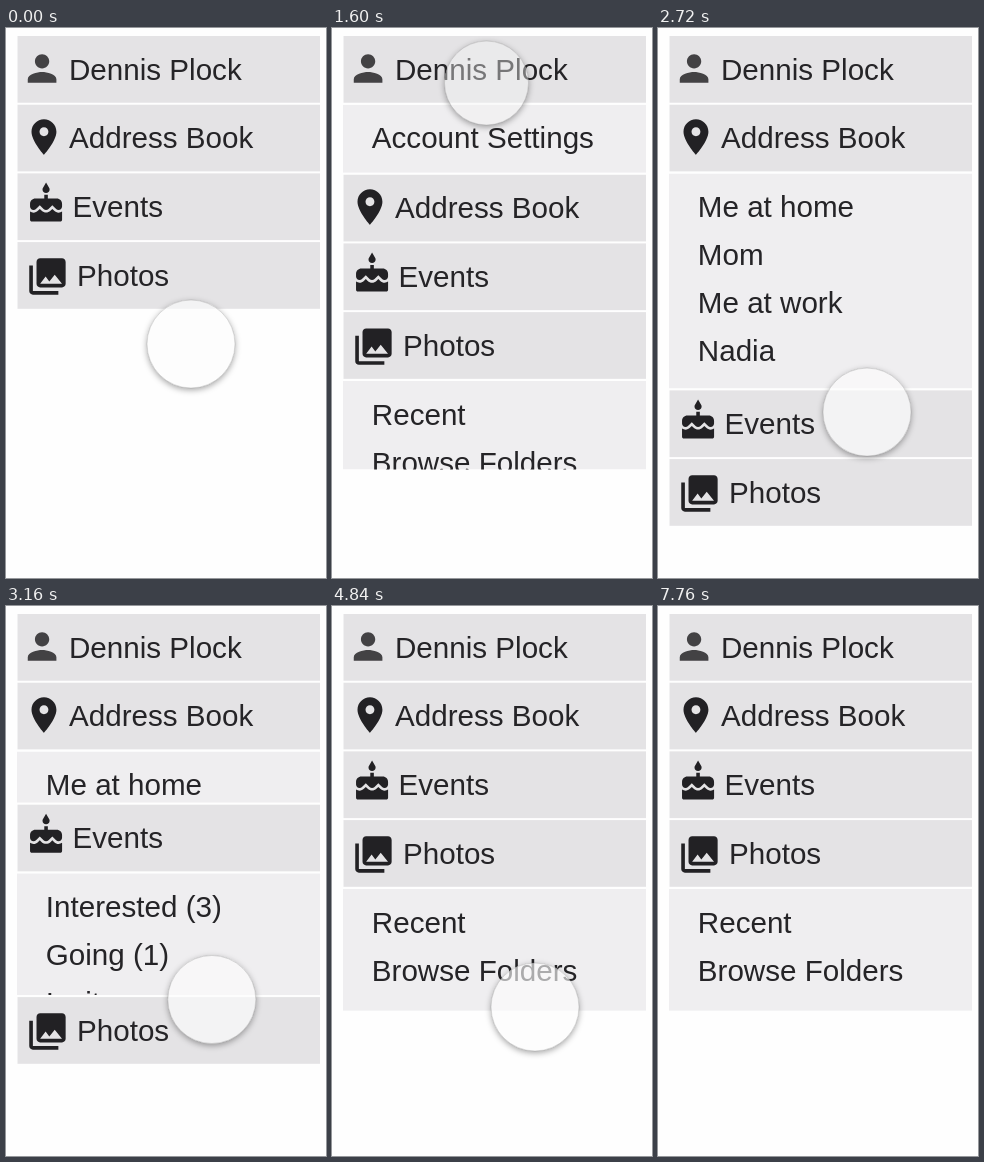
An HTML page with a canvas that plays this animation: 320 px wide and 550 px high, repeating every 7.8 s.

```html
<!DOCTYPE html>
<html lang="en">
<head>
<meta charset="utf-8">
<title>Accordion menu</title>
<style>
html, body { margin: 0; width: 100%; height: 100%; overflow: hidden; background: #fefefe; }
canvas { display: block; width: 320px; height: 550px; }
</style>
</head>
<body>
<canvas id="stage"></canvas>
<script>
const W = 320, H = 550, LOOP = 7800, SLIDE = 300;
const LEFT = 11.5, RIGHT = 314, TOP = 8, ROW = 66.7, GAP = 2, LINE = 48;

const canvas = document.getElementById('stage');
const ctx = canvas.getContext('2d');
const dpr = window.devicePixelRatio || 1;
canvas.width = W * dpr;
canvas.height = H * dpr;

const icons = {
  person: 'M12 12c2.21 0 4-1.79 4-4s-1.79-4-4-4-4 1.79-4 4 1.79 4 4 4zm0 2c-2.67 0-8 1.34-8 4v2h16v-2c0-2.66-5.33-4-8-4z',
  place: 'M12 2C8.13 2 5 5.13 5 9c0 5.25 7 13 7 13s7-7.75 7-13c0-3.87-3.13-7-7-7zm0 9.5c-1.38 0-2.5-1.12-2.5-2.5s1.12-2.5 2.5-2.5 2.5 1.12 2.5 2.5-1.12 2.5-2.5 2.5z',
  cake: 'M12 6c1.11 0 2-.9 2-2 0-.38-.1-.73-.29-1.03L12 0l-1.71 2.97c-.19.3-.29.65-.29 1.03 0 1.1.9 2 2 2zm4.6 9.99l-1.07-1.07-1.08 1.07c-1.3 1.3-3.58 1.31-4.89 0l-1.07-1.07-1.09 1.07C6.75 16.64 5.88 17 4.96 17c-.73 0-1.4-.23-1.96-.61V21c0 .55.45 1 1 1h16c.55 0 1-.45 1-1v-4.61c-.56.38-1.23.61-1.96.61-.92 0-1.79-.36-2.44-1.01zM18 9h-5V7h-2v2H6c-1.66 0-3 1.34-3 3v1.54c0 1.08.88 1.96 1.96 1.96.52 0 1.02-.2 1.38-.57l2.14-2.13 2.13 2.13c.74.74 2.03.74 2.77 0l2.14-2.13 2.13 2.13c.37.37.86.57 1.38.57 1.08 0 1.96-.88 1.96-1.96V12C21 10.34 19.66 9 18 9z',
  photos: 'M22 16V4c0-1.1-.9-2-2-2H8c-1.1 0-2 .9-2 2v12c0 1.1.9 2 2 2h12c1.1 0 2-.9 2-2zm-11-4l2.03 2.71L16 11l4 5H8l3-4zM2 6v14c0 1.1.9 2 2 2h14v-2H4V6H2z'
};

// full: height of the open panel including its gap
const menu = [
  { title: 'Dennis Plock', x: 63, full: 261, icon: 'person', ix: 14.6, iy: 11, size: 1.79, color: '#434244',
    items: ['Account Settings', 'My Orders', 'Games', 'Music Library', 'Video Library'] },
  { title: 'Address Book', x: 63, full: 217, icon: 'place', ix: 16.6, iy: 11, size: 1.78, color: '#222124',
    items: ['Me at home', 'Mom', 'Me at work', 'Nadia'] },
  { title: 'Events', x: 66.5, full: 164, icon: 'cake', ix: 18.7, iy: 9, size: 1.78, color: '#222124',
    items: ['Interested (3)', 'Going (1)', 'Invites'] },
  { title: 'Photos', x: 71, full: 124, icon: 'photos', ix: 19.6, iy: 12.6, size: 1.82, color: '#222124',
    items: ['Recent', 'Browse Folders'] }
];
for (const m of menu) m.shape = new Path2D(icons[m.icon]);

// [time, section] for each tap that opens a section
const taps = [[780, 3], [1497, 0], [2375, 1], [2960, 2], [3559, 3]];
const presses = [[700, 860], [1430, 1640], [2280, 2440], [2880, 3040], [3470, 3780]];
// [time, x, y]
const route = [
  [0, 185, 316], [560, 168, 256], [900, 166, 254], [1420, 154.5, 55], [1660, 154.5, 55],
  [2260, 208, 390], [2420, 208, 390], [2700, 209, 384], [2860, 209, 385], [3440, 203, 401], [7800, 203, 401]
];

const clamp = v => Math.max(0, Math.min(1, v));
const swing = v => 0.5 - Math.cos(clamp(v) * Math.PI) / 2;
const mix = (a, b, p) => a + (b - a) * p;

function openness(index, t) {
  let value = 0, active = -1;
  for (const [start, section] of taps) {
    if (t < start) break;
    const p = swing((t - start) / SLIDE);
    if (section === index) value = p;
    else if (active === index) value = 1 - p;
    else value = 0;
    active = section;
  }
  return value;
}

function label(text, x, y) {
  ctx.fillStyle = '#252427';
  ctx.fillText(text, x, y);
}

function drawHeader(m, y) {
  ctx.fillStyle = '#e4e3e5';
  ctx.fillRect(LEFT, y, RIGHT - LEFT, ROW);
  ctx.save();
  ctx.translate(m.ix, y + m.iy);
  ctx.scale(m.size, m.size);
  ctx.fillStyle = m.color;
  ctx.fill(m.shape);
  ctx.restore();
  label(m.title, m.x, y + 43.5);
}

function drawPanel(m, y, h) {
  ctx.save();
  ctx.beginPath();
  ctx.rect(LEFT - 0.5, y, RIGHT - LEFT + 0.5, h);
  ctx.clip();
  ctx.fillStyle = '#efeef0';
  ctx.fillRect(0, y, W, h);
  m.items.forEach((text, i) => label(text, 39.8, y + 43.7 + i * LINE));
  ctx.restore();
}

function drawMenu(t) {
  ctx.font = '29.6px "Liberation Sans", Arial, sans-serif';
  let y = TOP;
  menu.forEach((m, i) => {
    drawHeader(m, y);
    y += ROW + GAP;
    const h = m.full * openness(i, t);
    if (h > GAP) drawPanel(m, y, h - GAP);
    y += h;
  });
}

function position(t) {
  const i = Math.max(1, route.findIndex(k => k[0] > t));
  const [t0, x0, y0] = route[i - 1], [t1, x1, y1] = route[i];
  const p = swing((t - t0) / (t1 - t0));
  return [mix(x0, x1, p), mix(y0, y1, p)];
}

function pressure(t) {
  return Math.max(...presses.map(([a, b]) => Math.min(clamp((t - a) / 70), clamp((b + 70 - t) / 70))));
}

function drawTouch(t) {
  const alpha = 1 - clamp((t - 5000) / 400);
  if (!alpha) return;
  const [x, y] = position(t);
  const press = pressure(t);
  const disc = new Path2D();
  disc.arc(x, y, mix(44, 42, press), 0, Math.PI * 2);

  // shadow only outside the disc, so the fill stays translucent
  ctx.save();
  ctx.globalAlpha = alpha;
  const outside = new Path2D();
  outside.rect(0, 0, W, H);
  outside.addPath(disc);
  ctx.save();
  ctx.clip(outside, 'evenodd');
  ctx.shadowColor = 'rgba(0,0,0,0.36)';
  ctx.shadowBlur = 6 * dpr;
  ctx.shadowOffsetY = 2 * dpr;
  ctx.fillStyle = '#fff';
  ctx.fill(disc);
  ctx.restore();

  const shade = Math.round(mix(253, 243, press));
  ctx.fillStyle = `rgba(${shade},${shade},${shade},${mix(0.62, 0.4, press)})`;
  ctx.fill(disc);
  ctx.strokeStyle = 'rgba(130,130,130,0.28)';
  ctx.lineWidth = 1;
  ctx.stroke(disc);
  ctx.restore();
}

function frame(now) {
  const t = now % LOOP;
  ctx.setTransform(dpr, 0, 0, dpr, 0, 0);
  ctx.fillStyle = '#fefefe';
  ctx.fillRect(0, 0, W, H);
  drawMenu(t);
  drawTouch(t);
  requestAnimationFrame(frame);
}
frame(performance.now());
</script>
</body>
</html>
```
